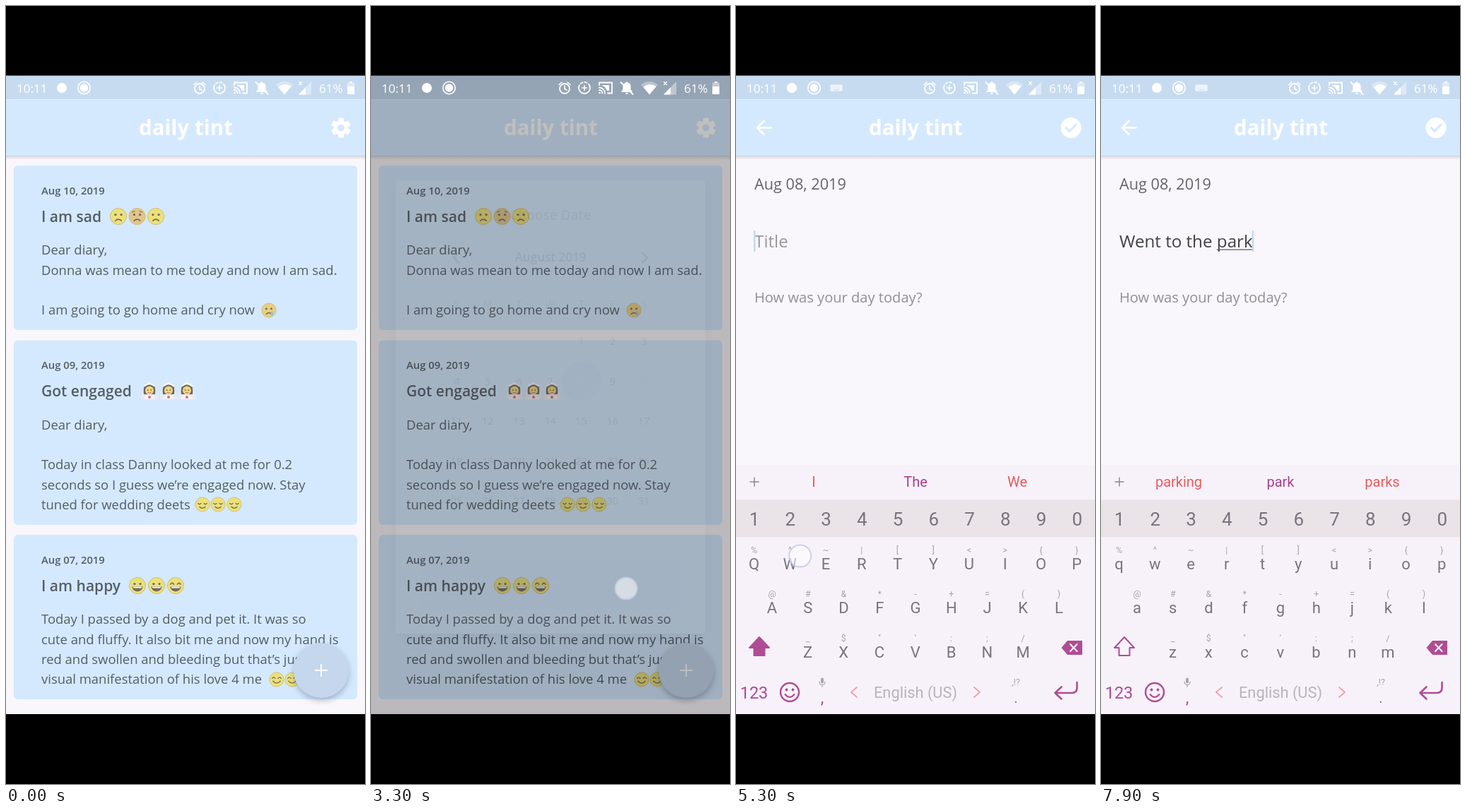
Recreate the animation shown at these times as an HTML page. Size 508x1102 px, loop 8 s.

```html
<!DOCTYPE html>
<html lang="en">
<head>
<meta charset="utf-8">
<title>Diary app</title>
<style>
html, body { margin: 0; width: 100%; height: 100%; overflow: hidden; background: #000; }
svg { display: block; width: 100vw; height: 100vh; }
text { font-family: "Open Sans", "Noto Sans", sans-serif; white-space: pre; }
.kb text { font-family: Roboto, sans-serif; }
.line { fill: none; stroke-linecap: round; stroke-linejoin: round; }
</style>
</head>
<body>
<svg id="stage" viewBox="0 0 508 1102" xmlns="http://www.w3.org/2000/svg"></svg>
<script>
const LOOP = 8000;
const BAR = '#c7dbf0', HEAD = '#d5e9fe', PAPER = '#f9f7fb', INK = '#555d66', PLUM = '#b04c94';

const esc = s => s.replace(/&/g, '&amp;').replace(/</g, '&lt;').replace(/>/g, '&gt;');
const text = (s, x, y, size, fill, weight = 400, anchor = 'start') =>
  `<text x="${x}" y="${y}" font-size="${size}" fill="${fill}" font-weight="${weight}" text-anchor="${anchor}">${esc(s)}</text>`;
const mid = (s, x, y, size, fill, weight) => text(s, x, y, size, fill, weight, 'middle');
const rect = (x, y, w, h, fill, rx = 0) =>
  `<rect x="${x}" y="${y}" width="${w}" height="${h}" fill="${fill}" rx="${rx}"/>`;
const dot = (x, y, r, fill, extra = '') => `<circle cx="${x}" cy="${y}" r="${r}" fill="${fill}" ${extra}/>`;
const line = (d, color, w = 2) => `<path class="line" d="${d}" stroke="${color}" stroke-width="${w}"/>`;
const shape = (d, fill) => `<path d="${d}" fill="${fill}"/>`;
const at = (x, y, s, body, extra = '') => `<g transform="translate(${x} ${y}) scale(${s})" ${extra}>${body}</g>`;

// Emoji, drawn on a circle of radius 10
const BROWN = '#6b5a45';
const eyes = dot(-3.4, -2, 1.4, BROWN) + dot(3.4, -2, 1.4, BROWN);
const arcs = dy => line(`M-6 -1.5q2 ${dy} 4 0M2 -1.5q2 ${dy} 4 0`, BROWN, 1.3);
const frown = line('M-3.6 5.2Q0 1.6 3.6 5.2', BROWN, 1.4);
const grin = shape('M-6.3 1H6.3A6.3 6 0 0 1 -6.3 1Z', BROWN) + shape('M-5.4 1.2H5.4L4.6 3H-4.6Z', '#fff');
const moods = {
  sad: eyes + frown,
  glum: eyes + frown + line('M-6 -5l3 -1M6 -5l-3 -1', BROWN, 1),
  cry: eyes + frown + shape('M4 1q3.5 4 1.5 6q-3 1 -3.5 -2Z', '#86b9e6'),
  grin: eyes + grin,
  laugh: arcs(-3) + grin,
  calm: arcs(2.5) + line('M-4 3.2Q0 7 4 3.2', BROWN, 1.3),
  smile: arcs(-3) + line('M-5 2.2Q0 7.5 5 2.2', BROWN, 1.3)
};
const face = (x, y, r, mood, fill = '#f0e167') =>
  at(x, y, r / 10, dot(0, 0, 9.6, fill, 'stroke="#cdb45e" stroke-width=".8"') + moods[mood], 'opacity=".88"');
const bride = (x, y) => at(x, y, 1, shape('M-12 12Q-9 -12 0 -13Q9 -12 12 12Z', '#ecebf4')
  + shape('M-8 5Q-10 -11 0 -11Q10 -11 8 5Z', '#66575c') + shape('M-8 12Q-7 6 0 6Q7 6 8 12Z', '#f8f6fa')
  + dot(0, -.5, 6, '#f0d76b') + line('M-7 -7Q0 -13 7 -7', '#fff', 2.4)
  + dot(-2.3, -1, .9, BROWN) + dot(2.3, -1, .9, BROWN) + line('M-2 2.5Q0 4 2 2.5', '#c65a68', 1)
  + dot(0, 9, 2, '#d0607e'), 'opacity=".9"');

function statusBar() {
  const w = '#fff';
  return text('10:11', 15, 122.5, 17, w) + dot(79, 116, 7, w)
    + dot(110.5, 116, 8.7, 'none', 'stroke="#fff" stroke-width="1.6"') + dot(110.5, 116, 5.8, w)
    + dot(274, 117, 7, 'none', 'stroke="#fff" stroke-width="1.8"')
    + line('M274 113V117.5L277 119M266 111.5l4 -3.5M282 111.5l-4 -3.5', w, 1.6)
    + `<circle class="line" cx="302" cy="116" r="8" stroke="#fff" stroke-width="1.8" stroke-dasharray="29 3 3 3 3 3"/>`
    + line('M302 112.5V119.5M298.5 116H305.5', w, 1.6)
    + line('M323 112V108.5H341V123.5H335M323 115.5A8 8 0 0 1 331 123.5M323 119A4.5 4.5 0 0 1 327.5 123.5', w, 1.8)
    + shape('M327 112H337V120H334Q332 114 327 113Z', w) + dot(323.6, 123, 1.3, w)
    + shape('M354.5 122V120.5L356.5 118.5V113.5Q357 109.5 360.5 108.5Q361.5 106 363.5 108.5Q367.5 109.5 367.5 113.5V118.5L369.5 120.5V122ZM360 123H364A2 2 0 0 1 360 123Z', w)
    + line('M353.5 108L370.5 125', w, 1.8)
    + shape('M382 111.5Q394 102 406 111.5L394 125.5Z', 'rgba(255,255,255,.35)')
    + shape('M385.5 115Q394 107.5 403.5 114L394 125.5Z', w)
    + shape('M432 107V125.5H414Z', 'rgba(255,255,255,.4)') + shape('M424 115.3V125.5H414Z', w)
    + line('M414.5 107.5l4 4M418.5 107.5l-4 4', w, 1.2)
    + text('61%', 443, 122.5, 17, w)
    + rect(483, 108.5, 10, 16.5, 'rgba(255,255,255,.45)', 1) + rect(486, 107, 4, 2, w) + rect(483, 114, 10, 11, w, 1)
    + `<g id="kbIcon">${rect(133.5, 111.5, 17, 9, 'rgba(255,255,255,.75)', 1)}${
      line('M136 114.3H148.5M136 116.6H148.5', BAR, 1).replace('/>', ' stroke-dasharray="0 2.5"/>')}${
      line('M138.5 118.8H145.5', BAR, 1)}</g>`;
}

const header = icon => rect(0, 132.5, 508, 80, HEAD) + rect(0, 212, 508, 6, 'url(#edge)')
  + mid('daily tint', 254.5, 183, 29.5, '#fff', 700) + icon;

function gear() {
  let teeth = '';
  for (let a = 0; a < 360; a += 60) teeth += `<rect x="-4" y="-14" width="8" height="9" rx="1.5" fill="#fff" transform="rotate(${a})"/>`;
  return at(474, 172.5, 1, teeth + dot(0, 0, 7.6, 'none', 'stroke="#fff" stroke-width="5.5"'));
}

function card(y, h, date, title, lines) {
  return rect(11, y, 486, h, '#d4e9fe', 6) + text(date, 50, y + 40.5, 14.8, INK, 600)
    + text(title, 50, y + 79.5, 21, INK, 600)
    + lines.map((s, i) => text(s, 50, y + 126.3 + i * 28.25, 18.45, INK)).join('');
}

function home() {
  return rect(0, 132, 508, 872, PAPER) + header(gear())
    + card(226, 233, 'Aug 10, 2019', 'I am sad',
      ['Dear diary,', 'Donna was mean to me today and now I am sad.', '', 'I am going to go home and cry now'])
    + face(159, 298, 12, 'sad') + face(185.5, 298, 12, 'glum', '#e3c27c') + face(212, 298, 12, 'sad') + face(372, 431, 10.5, 'cry', '#eccb72')
    + card(473.5, 261.5, 'Aug 09, 2019', 'Got engaged',
      ['Dear diary,', '', 'Today in class Danny looked at me for 0.2', 'seconds so I guess we’re engaged now. Stay', 'tuned for wedding deets'])
    + [203, 230, 256].map(x => bride(x, 545)).join('') + [278, 300, 323].map(x => face(x, 706, 10.5, 'calm')).join('')
    + card(749, 233, 'Aug 07, 2019', 'I am happy',
      ['Today I passed by a dog and pet it. It was so', 'cute and fluffy. It also bit me and now my hand is',
       'red and swollen and bleeding but that’s just a', 'visual manifestation of his love 4 me'])
    + face(186, 821, 12, 'grin') + face(213, 821, 12, 'grin') + face(240, 821, 12, 'laugh')
    + [383, 405, 427].map(x => face(x, 954, 10.5, 'smile')).join('')
    + `<g style="filter:drop-shadow(0 4px 4px rgba(60,80,110,.35))">${dot(446, 941, 39, '#c4d7ec')}</g>`
    + `<circle id="ripple" cx="446" cy="941" fill="#000"/>` + line('M438 941H454M446 933V949', '#fff', 2);
}

const dayX = i => 121 + 44.17 * i, dayY = r => 475 + 56.5 * r;
function dialog() {
  let s = `<g style="filter:drop-shadow(0 5px 9px rgba(0,0,0,.45))">${rect(35, 247, 438, 642, '#fdfcfe', 3)}</g>`
    + mid('Choose Date', 254, 303, 19, '#747376', 600) + mid('August 2019', 254, 362, 17.1, '#1d1d1f', 600)
    + line('M124 349.5L117 356.5L124 363.5M384 349.5L391 356.5L384 363.5', '#1d1d1f', 2.4)
    + `<circle id="pick" cy="531.5" r="28" fill="${BAR}"/>`;
  [...'SMTWTFS'].forEach((c, i) => s += mid(c, dayX(i), 426.5, 14.5, '#7a7a7e'));
  for (let d = 1; d <= 31; d++) {
    const k = d + 3;
    s += mid('' + d, dayX(k % 7), dayY(Math.floor(k / 7)) + 5.3, 14.6, '#222').replace('<text', `<text id="d${d}"`);
  }
  return s + rect(70.5, 786, 367, 67.5, BAR) + `<rect id="okPress" x="70.5" y="786" width="367" height="67.5" fill="#fff"/>`
    + mid('OK', 254.5, 826, 16.5, '#fff', 700);
}

function editor() {
  return rect(0, 132, 508, 872, PAPER)
    + header(line('M49.5 172.5H30.5M39.5 163L30 172.5L39.5 182', '#fff', 2.6)
      + dot(474, 172.5, 14.5, '#fff') + line('M467 172.5L472 177.5L481 168', HEAD, 3))
    + text('Aug 08, 2019', 26, 260, 21.7, '#656469')
    + `<text id="entry" x="26" y="342" font-size="24.2" xml:space="preserve"></text>`
    + `<rect id="under" y="344.5" height="1.2" fill="#555"/><rect id="caret" y="318" width="2.5" height="30" fill="#c3d9f1"/>`
    + text('How was your day today?', 26, 420, 20.1, '#919095');
}

const STEP = 50.75;
const rows = [
  { keys: 'qwertyuiop', signs: '%^~|[]<>{}', x: 25.5, y: 797.5 },
  { keys: 'asdfghjkl', signs: '@#&*-+=()', x: 51, y: 860 },
  { keys: 'zxcvbnm', signs: '_$"\':;/', x: 101.5, y: 922.5 }
];
function keyboard() {
  let s = rect(0, 650, 508, 354, '#f7f2fa') + rect(0, 699.5, 508, 53, '#eae4e9')
    + line('M20 674H32M26 668V680', '#8a858c', 1.4);
  [110, 254, 398].forEach((x, i) => s += mid('', x, 681, 20, i === 1 ? '#a8408c' : '#e85a5e').replace('<text', `<text id="s${i}"`));
  [...'1234567890'].forEach((c, i) => s += mid(c, 26 + STEP * i, 735.5, 26, '#79747b'));
  for (const r of rows) [...r.keys].forEach((c, i) => {
    s += mid(c, r.x + STEP * i, r.y, 22, '#79747b').replace('<text', '<text class="key"')
      + mid(r.signs[i], r.x + STEP * i, r.y - 23, 12.5, '#a8a2aa');
  });
  return s + `<path id="shift" class="line" d="M33 894L47 909H40.5V920H25.5V909H19Z" stroke="${PLUM}" stroke-width="2"/>`
    + shape('M460.5 909L469 899H490V919H469Z', PLUM) + line('M473 904l9.5 10M482.5 904l-9.5 10', '#f7f2fa', 2)
    + mid('123', 25.5, 980.5, 23.5, PLUM) + dot(76, 972, 13, 'none', `stroke="${PLUM}" stroke-width="2.4"`)
    + dot(71.5, 968.5, 1.9, PLUM) + dot(80.5, 968.5, 1.9, PLUM) + line('M69.5 975Q76 983 82.5 975', PLUM, 2)
    + rect(120, 951.5, 4, 8, '#aaa4ac', 2) + line('M118 957Q118 961.5 122 961.5Q126 961.5 126 957M122 962V964.5', '#aaa4ac', 1.2)
    + mid(',', 122, 988, 23, PLUM) + line('M171 965L163 972L171 979M337 965L345 972L337 979', '#f3a3ab', 2)
    + mid('English (US)', 254, 979.5, 21.8, '#b9b3bb') + mid(',!?', 396, 962, 12.5, '#a8a2aa') + mid('.', 396, 987, 21, '#79747b')
    + line('M482.5 958V966Q482.5 973 475 973H452M460.5 964.5L451.5 973L460.5 981.5', PLUM, 2.6);
}

document.getElementById('stage').innerHTML =
  `<defs><linearGradient id="edge" x2="0" y2="1"><stop stop-color="#8c8c98" stop-opacity=".3"/><stop offset="1" stop-color="#8c8c98" stop-opacity="0"/></linearGradient></defs>
  ${rect(0, 98, 508, 906, BAR)}<g id="home">${home()}</g><g id="editor">${editor()}</g>
  <rect id="scrim" y="98" width="508" height="906"/><g id="dialog">${dialog()}</g>
  ${statusBar()}<g id="kb" class="kb">${keyboard()}</g><g id="taps"></g>
  ${rect(0, 0, 508, 98.6, '#000')}${rect(0, 1003, 508, 99, '#000')}`;

const $ = id => document.getElementById(id);
const set = (id, o) => { for (const k in o) $(id).setAttribute(k, o[k]); };
const ramp = (t, a, b) => Math.min(1, Math.max(0, (t - a) / (b - a)));
const out = p => 1 - (1 - p) ** 3;

const PHRASE = 'Went to the park';
const HINTS = ['I|The|We', 'We|W|With', 'Well|We|Were', 'Went|Wen|When', 'Going|Went|Want', 'to|back|out', 'to|t|to the',
  'to the|to|too', 'the|a|my', 'the|t|to', 'the|th|that', 'they|the|then', 'store|park|gym', 'park|p|party',
  'park|pa|party', 'park|par|part', 'parking|park|parks'];
const typedAt = i => i < 6 ? 5320 + 144 * i : 6040 + 162 * (i - 5);

function keySpot(c) {
  for (const r of rows) {
    const i = r.keys.indexOf(c.toLowerCase());
    if (i >= 0) return [r.x + STEP * i + 14.5, r.y - 18.5];
  }
  return [219, 970];
}

// Each tap: press time, release time, x, y
const taps = [[850, 930, 446, 940], [2250, 2350, 300, 534], [3030, 3310, 361, 825], [4330, 4420, 77, 340],
  ...[...PHRASE].map((c, i) => [typedAt(i) - 30, typedAt(i), ...keySpot(c)])];

function drawTaps(t) {
  $('taps').innerHTML = taps.map(([a, b, x, y]) => {
    const o = Math.min(ramp(t, a - 50, a), 1 - ramp(t, b, b + 230));
    return o > 0 ? dot(x, y, 15.5, 'rgba(255,255,255,.55)', `stroke="#c3cbe6" stroke-opacity=".85" stroke-width="2" opacity="${o}"`) : '';
  }).join('');
}

function drawEntry(t) {
  let n = 0;
  while (n < PHRASE.length && typedAt(n) <= t) n++;
  const s = PHRASE.slice(0, n), el = $('entry');
  el.textContent = s || 'Title';
  el.setAttribute('fill', s ? '#414044' : '#99989c');
  const width = k => k ? el.getSubStringLength(0, k) : 0;
  const start = s.lastIndexOf(' ') + 1, end = 26 + width(n), from = 26 + width(start);
  set('under', { x: from, width: Math.max(0, end - from) });
  set('caret', { x: end - 1, opacity: t > 4480 ? 1 : 0 });
  HINTS[n].split('|').forEach((h, i) => $('s' + i).textContent = h);
  document.querySelectorAll('.key').forEach(k => k.textContent = n ? k.textContent.toLowerCase() : k.textContent.toUpperCase());
  $('shift').style.fill = n ? 'none' : PLUM;
}

function draw(t) {
  const press = ramp(t, 900, 1070);
  set('ripple', { r: 10 + 29 * press, opacity: press ? .225 * (1 - ramp(t, 1160, 1400)) : 0 });

  const open = ramp(t, 1180, 1420);
  set('scrim', { opacity: .566 * open * (1 - ramp(t, 3150, 3420)) });
  set('dialog', { opacity: open * (1 - ramp(t, 3150, 3310)) });
  const picked = t >= 2350;
  set('pick', { cx: dayX(picked ? 4 : 6) });
  set('d8', { fill: picked ? '#fff' : '#222' });
  set('d10', { fill: picked ? BAR : '#fff' });
  set('okPress', { opacity: .4 * ramp(t, 3030, 3120) });

  const enter = out(ramp(t, 3450, 3850));
  set('editor', { opacity: enter, transform: `translate(0 ${60 * (1 - enter)})` });

  const up = out(ramp(t, 4560, 4860));
  set('kb', { transform: `translate(0 ${354 * (1 - up)})`, opacity: up });
  set('kbIcon', { opacity: t > 4650 ? 1 : 0 });
  drawEntry(t);
  drawTaps(t);
}

function tick() {
  draw(performance.now() % LOOP);
  requestAnimationFrame(tick);
}
tick();
</script>
</body>
</html>
```
